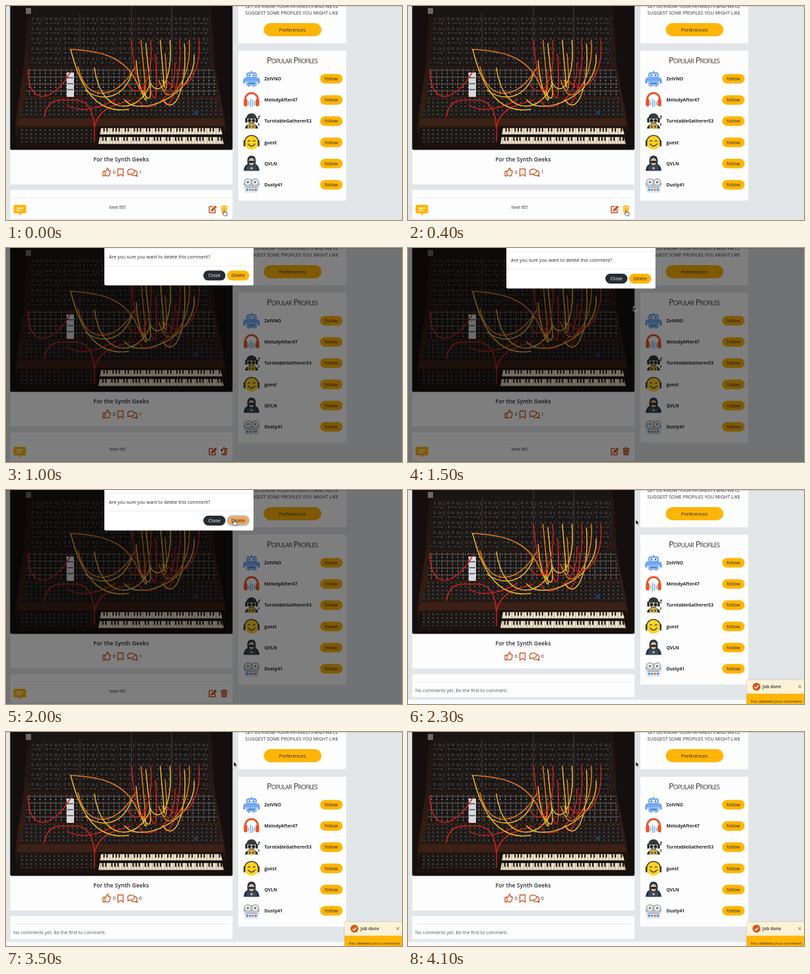
Animation, 600 px wide and 325 px high, one loop 4.2 s. Source, as an HTML page:

```html
<!DOCTYPE html>
<html lang="en">
<head>
<meta charset="utf-8">
<title>Delete a comment</title>
<style>
html, body { margin: 0; width: 100%; height: 100%; overflow: hidden; background: #e2e6e9; }
svg.stage { display: block; width: 100vw; height: 100vh; }
text { font: 7px "Open Sans", "Noto Sans", sans-serif; fill: #26292d; }
.mid { text-anchor: middle; }
.title { font-size: 8.7px; font-weight: 600; }
.name { font-size: 6.8px; font-weight: 700; }
.btn { font-size: 7.3px; text-anchor: middle; }
.hand-lettered { font-stretch: 75%; text-anchor: middle; fill: #333; }
.heading { font-size: 13px; font-weight: 500; font-variant: small-caps; letter-spacing: -.7px; }
.card { fill: #fdfdfe; }
.gold { fill: #ffb507; }
.rust { fill: none; stroke: #ce551d; stroke-width: 1.3; stroke-linejoin: round; stroke-linecap: round; }
.cable { fill: none; stroke-width: 1.5; stroke-linecap: round; }

/* one loop: 4.2 s */
.flip, .cursor, .backdrop, .modal { animation: 4.2s step-end infinite; }
.before { animation-name: before; }
.after { animation-name: after; }
.trash { animation-name: trash; }
.delete { animation-name: delete; }
.arrow { animation-name: arrow; }
.pointer { animation-name: pointer; }
.cursor { animation-name: move; animation-timing-function: ease-in-out; }
.backdrop { animation-name: dim; animation-timing-function: linear; }
.modal { animation-name: drop; animation-timing-function: linear; }
@keyframes before { 0% { visibility: visible } 52.381%, 100% { visibility: hidden } }
@keyframes after { 0% { visibility: hidden } 52.381%, 100% { visibility: visible } }
@keyframes trash { 0% { fill: #ffb507 } 19.524%, 100% { fill: #ce551d } }
@keyframes delete {
  0% { fill: #ffb507; stroke: transparent }
  39.048% { fill: #f4a45c; stroke: transparent }
  45.238%, 100% { fill: #f4a45c; stroke: #b5cbe6 }
}
@keyframes arrow {
  0% { visibility: hidden } 16.667% { visibility: visible }
  39.048% { visibility: hidden } 52.381%, 100% { visibility: visible }
}
@keyframes pointer {
  0% { visibility: visible } 16.667% { visibility: hidden }
  39.048% { visibility: visible } 52.381%, 100% { visibility: hidden }
}
@keyframes move {
  0%, 19.048% { transform: translate(330px, 310px) }
  23.81% { transform: translate(325px, 303px) }
  40.476%, 100% { transform: translate(345px, 45px) }
}
@keyframes dim {
  0%, 19.524% { opacity: 0 } 23.095%, 52.38% { opacity: .5 }
  52.381%, 100% { opacity: 0 }
}
@keyframes drop {
  0% { opacity: 0; transform: translateY(-22px) }
  19.524% { opacity: 0; transform: translateY(-22px); animation-timing-function: ease-out }
  22.6% { opacity: 1 }
  26.667%, 52.38% { opacity: 1; transform: none }
  52.381%, 100% { opacity: 0; transform: none }
}
</style>
</head>
<body>
<svg class="stage" viewBox="0 0 600 325" preserveAspectRatio="none">
  <defs>
    <pattern id="knobs" width="28" height="15" patternUnits="userSpaceOnUse">
      <path d="M.5 0V15" stroke="#37302d" stroke-width=".6"/>
      <g fill="#120e0c" stroke="#6b625c" stroke-width=".7">
        <circle cx="5" cy="4.500" r="1.500"/><circle cx="12" cy="4.500" r="1.500"/><circle cx="20" cy="5" r="1.700"/>
        <circle cx="6" cy="11" r="1.200"/><circle cx="23" cy="11.500" r="1.200"/>
      </g>
      <path d="M11 11h1M15 11h1M18 11h1M25 4h1M25 7h1" stroke="#a39b93"/>
    </pattern>
    <pattern id="jacks" width="7" height="6" patternUnits="userSpaceOnUse">
      <circle cx="3" cy="2.500" r="1.100" fill="#0d0b0a" stroke="#80766e" stroke-width=".6"/>
      <path d="M5.500 5h1" stroke="#6d6560" stroke-width=".7"/>
    </pattern>
    <pattern id="switches" width="8" height="10.500" patternUnits="userSpaceOnUse">
      <circle cx="3.500" cy="3" r="1.400" fill="#0d0b0a" stroke="#a8a099" stroke-width=".7"/>
      <path d="M2.700 8h1.600M7 3h1" stroke="#d8d2cb" stroke-width="1.200"/>
    </pattern>
    <pattern id="keys" x="143" width="4.600" height="30" patternUnits="userSpaceOnUse">
      <path d="M.3 0V30" stroke="#6b5a48" stroke-width=".6"/>
    </pattern>
    <linearGradient id="wood" x2="0" y2="1">
      <stop stop-color="#1d120e"/><stop offset=".75" stop-color="#351d14"/><stop offset="1" stop-color="#1f110c"/>
    </linearGradient>
    <clipPath id="photo"><path d="M6.300 0H343.300V216.500q0 2-2 2h-333q-2 0-2-2z"/></clipPath>
  </defs>

  <rect width="600" height="325" fill="#e2e6e9"/>
  <rect class="card" x="6.500" y="0" width="336.800" height="271" rx="1"/>
  <rect class="card" x="352" y="-5" width="163.500" height="61.500" rx="1"/>
  <rect class="card" x="352" y="68" width="163.500" height="227.500" rx="1"/>
  <rect width="600" height="1" fill="#b8bbbf" opacity=".7"/>

  <g clip-path="url(#photo)">
    <rect x="6" width="338" height="219" fill="#140f0e"/>
    <path d="M33 0H311L316 90 333 182 330 214H16L14 180 27 92z" fill="url(#wood)"/>
    <path d="M40 0H309V91H34z" fill="#1a1615"/>
    <path d="M40 14H309V91H34z" fill="url(#knobs)"/>
    <path d="M33 94H314L321 137H30z" fill="#1a1615"/>
    <path d="M33 94H314L321 137H30z" fill="url(#switches)"/>
    <path d="M29 140H320L328 169H21z" fill="#1b1716"/>
    <path d="M29 140H320L328 169H21z" fill="url(#jacks)"/>
    <path d="M20 171H328L331 182H17z" fill="#3c2117"/>
    <path d="M18 185H136V210H15z" fill="#171312"/>
    <path d="M22 187H133V207H22z" fill="url(#jacks)"/>
    <path d="M139 183H330L333 213H137z" fill="#17100d"/>
    <path d="M112 12V91M190 0V137M251 0V91M112 94V137M282 94V137" stroke="#453d3a"/>
    <rect x="30" y="3" width="8" height="9" fill="#6b6865"/>
    <rect x="92" y="101" width="11" height="37" fill="#d9dadb"/>
    <path d="M93 109H102M93 118H102M93 127H102" stroke="#6c7180" stroke-width="2"/>
    <rect x="285" y="159" width="6" height="6" fill="#22385d"/>
    <g id="manuals"></g>
    <g id="cables"></g>
  </g>

  <text class="mid title" x="174.500" y="236">For the Synth Geeks</text>
  <g class="rust">
    <path d="M147 251h3v7h-3zM150 252l3-4c0-3 3-2 2 2h2q1.500 0 1 2l-1 4q-.4 2-2 2h-2l-3-1"/>
    <path d="M169.500 247.500h8v11l-4-3-4 3z"/>
    <path d="M184.500 256c2-2-1-3 0-5.500 2-4.500 10.500-3.500 10 1-.4 3.500-4 4-6 3.500q-2 1.500-4 1zM195.500 250c4 1 4 5 2 6.500l1.500 2q-2 0-3.500-1.200c-2 .7-4 .3-5.500-1"/>
  </g>
  <text class="mid" x="163.700" y="255.300">0</text>
  <text class="mid flip before" x="203.700" y="255.300">1</text>
  <text class="mid flip after" x="203.700" y="255.300">0</text>

  <g class="flip before">
    <rect class="card" x="6.500" y="279.500" width="336.800" height="44" rx="1"/>
    <path d="M11 291.500H339" stroke="#e7e8ea" stroke-width=".8"/>
    <text class="mid" x="169" y="308">love it!!!</text>
    <path class="gold" d="M13.500 302h15q2 0 2 2v9q0 2-2 2H24l-4 3.500V315h-6.500q-2 0-2-2v-9q0-2 2-2z"/>
    <path d="M16 307h10M16 310.500h7" stroke="#fff" stroke-width="1.400"/>
    <path class="rust" d="M313 304.500h-5v9.500h9v-4.500" style="stroke-width:1.600"/>
    <path d="M311 309l6-6 2.500 2.500-6 6-3 .5z" fill="#ce551d"/>
    <g class="flip trash">
      <path d="M325 304h3l1-1.300h3l1 1.300h3v1.500h-11zM326 306.300h9l-.6 7.200q-.1 1.200-1.300 1.200h-5.200q-1.200 0-1.300-1.200z"/>
      <path d="M328.500 308v5M330.500 308v5M332.500 308v5" stroke="#fff" stroke-opacity=".75" stroke-width=".7"/>
    </g>
  </g>
  <g class="flip after">
    <rect class="card" x="6.500" y="279.500" width="336.800" height="35" rx="1"/>
    <path d="M11 291.500H339" stroke="#e7e8ea" stroke-width=".8"/>
    <text x="11" y="307" style="fill:#55585c">No comments yet. Be the first to comment.</text>
    <rect y="318.500" width="600" height="7" fill="#f8f9fa"/>
  </g>

  <text class="hand-lettered" x="433" y="2.800">LET US KNOW YOUR INTERESTS AND WE'LL</text>
  <text class="hand-lettered" x="433" y="13">SUGGEST SOME PROFILES YOU MIGHT LIKE</text>
  <rect class="gold" x="390.500" y="26" width="87.500" height="20" rx="10"/>
  <text class="btn" x="434" y="38.600">Preferences</text>
  <text class="hand-lettered heading" x="433.500" y="87">Popular Profiles</text>
  <g id="profiles"></g>

  <g class="flip after">
    <rect x="512" y="287.500" width="90" height="40" fill="#8a8d90" opacity=".25"/>
    <rect x="513" y="288.500" width="87" height="21" fill="#fdf2d3"/>
    <rect class="gold" x="513" y="309.500" width="87" height="16"/>
    <circle cx="528" cy="298.800" r="6" fill="#d0581f"/>
    <path d="M525.200 299l2 2 3.700-4" fill="none" stroke="#fff" stroke-width="1.300"/>
    <text x="537" y="301.200" style="font-size:6.500px;font-weight:700;fill:#4d4f52">Job done</text>
    <path d="M591.500 296.500l4 4m0-4l-4 4" stroke="#55534d" stroke-width=".9"/>
    <text x="519" y="322.500" style="font-size:6.150px">You deleted your comment</text>
  </g>

  <rect class="backdrop" width="600" height="325"/>
  <g class="modal">
    <rect x="149" y="-60" width="226" height="121.500" rx="2" fill="#fff"/>
    <path d="M149 5.500H375M149 32H375" stroke="#e0e2e5" stroke-width=".7"/>
    <text x="156" y="21">Are you sure you want to delete this comment?</text>
    <rect x="299" y="39" width="33.500" height="15" rx="7.500" fill="#272c33"/>
    <text class="btn" x="315.700" y="49" style="fill:#fff">Close</text>
    <rect class="flip delete" x="335" y="39" width="33.500" height="15" rx="7.500" stroke-width="1.800"/>
    <text class="btn" x="351.700" y="49" style="font-size:7px">Delete</text>
  </g>

  <g class="cursor" stroke-linejoin="round">
    <path class="flip arrow" d="M0 0V7.600L1.800 6 3.100 8.800 4.400 8.200 3.200 5.500H5.600z" fill="#111" stroke="#fff" stroke-width=".6"/>
    <path class="flip pointer" d="M-.2.700Q.6-.3 1.300.7V3.500L4.800 4.200Q5.500 4.500 5.200 6L4.500 8.700H.3L-2 5.500Q-2 4.400-.2 5.200z" fill="#fff" stroke="#222" stroke-width=".7"/>
  </g>
</svg>

<script>
const fill = (id, html) => { document.getElementById(id).innerHTML = html; };

// a keyboard with sharps grouped in twos and threes
const manual = (x, y, w, h) => {
  let sharps = '';
  for (let i = 0; i * 4.6 < w - 5; i++)
    if (i % 7 !== 2 && i % 7 !== 6)
      sharps += `M${x + 4.6 * i + 4.6} ${y}v${h * 0.55}`;
  const shape = `M${x} ${y}h${w}l3 ${h}H${x - 2}z`;
  return `<path d="${shape}" fill="#eee1c9"/><path d="${shape}" fill="url(#keys)"/>
    <path d="${sharps}" stroke="#17110e" stroke-width="2"/>`;
};
fill('manuals', manual(144, 185.5, 181, 9.5) + manual(142, 199, 185, 10.5));

const red = '#d2221c', orange = '#ea7a1e', yellow = '#f2b92c';
const cable = (color, d) => `<path class="cable" stroke="${color}" d="${d}"/>`;

let seed = 11;
const rand = () => (seed = seed * 16807 % 2147483647) / 2147483647;

// patch leads hanging from the upper right modules
const hanging = Array.from({ length: 15 }, (_, i) => {
  const x = 190 + 7.3 * i, y = 52 + 36 * rand() * (i % 2);
  const endX = 178 + 75 * rand(), endY = 112 + 32 * rand();
  return cable([red, yellow, orange, yellow, red][i % 5],
    `M${x} ${y}C${x + 5} ${y + 62} ${endX + 25 * rand()} ${endY + 28} ${endX} ${endY}`);
});
const long = [
  [red, 'M33 97C34 152 70 148 98 100'],
  [red, 'M58 168C64 136 84 144 104 143S136 158 134 206'],
  [red, 'M92 150C115 166 150 151 166 142'],
  [red, 'M134 183C140 158 160 150 190 143'],
  [orange, 'M98 66C150 68 187 80 203 128'],
  [orange, 'M109 92C122 152 171 140 196 92'],
  [yellow, 'M98 66C118 146 150 162 186 157'],
  [yellow, 'M134 94C145 172 205 163 219 116'],
  [yellow, 'M120 128C148 148 178 138 190 104']
];
fill('cables', long.map(c => cable(...c)).concat(hanging).join(''));

const eyes = (x, y, r, color) =>
  `<g fill="${color}"><circle cx="${-x}" cy="${y}" r="${r}"/><circle cx="${x}" cy="${y}" r="${r}"/></g>`;

const avatars = {
  robot: `<path d="M0-12V-8" stroke="#4c88dc" stroke-width="1.500"/>
    <rect x="-8" y="-10" width="16" height="9" rx="4" fill="#70a8f0"/>
    <path d="M-11 1v6M11 1v6" stroke="#5b96ea" stroke-width="3"/>
    <rect x="-12" y="-2" width="24" height="6" rx="3" fill="#70a8f0"/>
    <rect x="-8" y="3" width="16" height="8" rx="2" fill="#8dbaf4"/>
    <rect x="-6" y="-7.500" width="12" height="4.500" rx="2.200" fill="#e9f2fe"/>${eyes(3, -5.2, 1.3, '#376bb8')}
    <path d="M-5 7H5M-4 12v-2M4 12v-2" stroke="#376bb8" stroke-width="1.300"/>`,
  headphones: `<path d="M-9.500 3V-1A9.500 9.500 0 0 1 9.500-1V3" fill="none" stroke="#e9562a" stroke-width="3"/>
    <path d="M-9 1V7M9 1V7" stroke="#e9562a" stroke-width="5.500" stroke-linecap="round"/>
    <path d="M-4.500 2v6M-1.500-2v13M1.500 0v10M4.500 2v6" stroke="#7ab0e6" stroke-width="1.500"/>`,
  listener: `<path d="M-10 11Q-9 4 0 4T10 11z" fill="#25323b"/>
    <circle cy="-2" r="7.500" fill="#ead7a9"/><path d="M-8-4Q-7-12 0-12T8-4z" fill="#343b3e"/>
    <path d="M-8-5V2M8-5V2" stroke="#1e2527" stroke-width="3"/>
    ${eyes(3, -1, 2.5, '#1e2527')}<path d="M-4 3H4" stroke="#574431" stroke-width="1.500"/>
    <rect x="-6" y="5.500" width="12" height="6" rx="1" fill="#d7ad43"/>${eyes(2.5, 8.5, 1.2, '#272c2d')}
    <path d="M11-8v5M11-8l2 1M11 3v4" stroke="#222" stroke-width="1.200"/>`,
  smiley: `<circle r="10.800" fill="#fbd324"/>
    <path d="M-10.500-2A10.700 10.700 0 0 1 10.500-2" fill="none" stroke="#3a3834" stroke-width="1.500"/>
    <path d="M-10.800-2V5M10.800-2V5" stroke="#3a3834" stroke-width="2.600" stroke-linecap="round"/>
    <path d="M-5.500-1.500q1.700-2.500 3.400 0M2.100-1.500q1.700-2.500 3.400 0M-5.500 2Q0 9.500 5.500 2" fill="none" stroke="#4b3510" stroke-width="1.300"/>`,
  hooded: `<path d="M-12 11Q-11 2-6 1Q-8-12 0-12Q8-12 6 1Q11 2 12 11z" fill="#22344b"/>
    <ellipse cy="-3" rx="4.500" ry="5.500" fill="#e4b78d"/><path d="M-4.500-4H4.500V-1H-4.500z" fill="#18202b"/>
    <path d="M-7 3H7L8 11H-8z" fill="#3e4a57"/><circle cy="7" r="1.500" fill="#cfd7de"/>`,
  retro: `<path d="M-12-3Q-11-10-5-10L0-8 5-10Q11-10 12-3V2H-12z" fill="#b0b6ba"/>
    ${eyes(5.5, -4, 4, '#eef1f3')}${eyes(5.5, -4, 1.7, '#6c747b')}
    <path d="M-12 2H12L10 12H-10z" fill="#dfe4e8"/>
    <path d="M-9 3.500H9" stroke="#8b949b" stroke-width="1.300"/>${eyes(6.5, 7.5, 1.7, '#3f87d9')}
    <circle cx="-2" cy="7.500" r="1.600" fill="#3f87d9"/><circle cx="2.200" cy="7.500" r="1.600" fill="#e3633a"/>`
};
const people = [
  ['ZelVNO', 'robot'], ['MelodyAfter47', 'headphones'], ['TurntableGatherer53', 'listener'],
  ['guest', 'smiley'], ['QVLN', 'hooded'], ['Dusty41', 'retro']
];
fill('profiles', people.map(([name, avatar], i) =>
  `<g transform="translate(0 ${110.5 + 32.2 * i})">
    <g transform="translate(372)">${avatars[avatar]}</g>
    <text class="name" x="391.500" y="2.500">${name}</text>
    <rect class="gold" x="476" y="-7.300" width="34" height="14.600" rx="7.300"/>
    <text class="btn" x="493" y="2.500">follow</text>
  </g>`).join(''));
</script>
</body>
</html>
```
